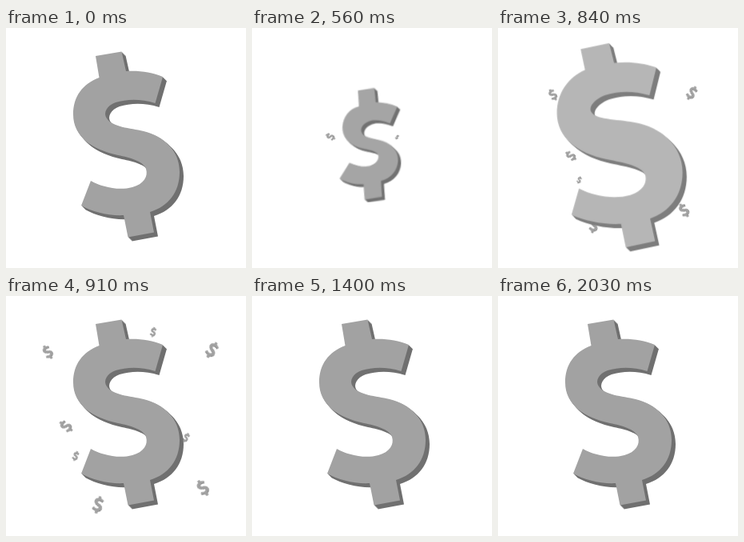
Write an HTML page without scripts that moves like this. It is 300x300 px and loops after 2170 ms.

```html
<!DOCTYPE html>
<html lang="en">
<head>
<meta charset="utf-8">
<title>Dollar burst</title>
<style>
  /* Three poses of the same outline, so they can be blended. */
  :root {
    --rest: path("M112 35 L144.5 29.5 L150 54 C166 53 182 55 196 61 L186.5 94 C168 88 150 89 137 93 C126 97 121 106 126 113 C133 124 155 125 172 129 C196 135 217 152 217 180 C217 205 203 223 180 230 L185 255.5 L152.5 261.5 L147 234 C129 235 108 230 94 222 L106 191 C118 198 140 204 158 199 C172 195 178 186 175 176 C171 166 155 162 140 159 C108 152 84 136 84 108 C84 85 96 70 116.5 62 Z");
    --small: path("M125 57 L150.5 54 L154 77.5 C166 78 177 81 188 86 L178 113 C164 106 150 105 143 109 C134 113 131 121 136 128 C142 136 156 136 168 141 C184 147 194 160 194 174 C194 190 185 202 169 206 L172 232 L145 235 L142 210 C128 210 114 206 104 199 L118 174 C132 181 147 184 156 178 C163 174 165 166 161 161 C156 155 143 154 132 150 C114 143 104 130 104 115 C104 99 113 86 128 83 Z");
    --bold: path("M98 27 L134 18 L140.5 41 C159 38 179 40 196 45 L189 79 C168 73 150 74 134 79 C121 83 108 92 109 99 C112 108 140 105 166 109 C208 114 238 143 238 178 C238 208 221 230 197 239 L204 268 L166 277 L160 248 C138 249 114 246 94 238 L100 206 C122 217 150 220 171 214 C186 209 193 198 190 188 C186 177 158 173 133 168 C95 160 69 138 69 108 C69 82 84 60 104 50 Z");
  }
  html, body { margin: 0; height: 100%; overflow: hidden; background: #fff; }
  svg { display: block; width: 100%; height: 100%; }
  path { d: var(--rest); fill: #a2a2a2; }
  .side path, path.side { fill: #707070; }

  /* One loop is 31 ticks of 70 ms. */
  .big {
    transform-origin: 148px 145px;
    animation: zoom 2170ms step-end infinite;
  }
  .big path { animation: morph 2170ms step-end infinite; }
  @keyframes morph {
    0%     { d: var(--rest); }
    19.35% { d: var(--small); }
    25.8%  { d: var(--small); animation-timing-function: steps(2, end); }
    32.25% { d: var(--bold); }
    35.48% { d: var(--bold); animation-timing-function: steps(2, end); }
    41.93%, 100% { d: var(--rest); }
  }
  @keyframes zoom {
    0%     { transform: matrix(1, 0, 0, 1, 0, 0); filter: brightness(1); }
    19.35% { transform: matrix(1, 0, 0, 1, 0, 0); filter: brightness(.97); animation-timing-function: steps(2, end); }
    25.8%  { transform: matrix(.8, -.036, -.043, .769, -1, 0); filter: brightness(1.02); animation-timing-function: steps(2, end); }
    32.25% { transform: matrix(1, 0, 0, 1, 0, 0); filter: brightness(1.25); }
    35.48% { transform: matrix(1.08, 0, 0, 1.08, 0, 0); filter: brightness(1.25); animation-timing-function: steps(2, end); }
    41.93%, 100% { transform: matrix(1, 0, 0, 1, 0, 0); filter: brightness(1); }
  }

  /* Each spark flies for 8 ticks, starting at tick --born. */
  .spark {
    opacity: 0;
    transform-origin: 0 0;
    animation: fly 2170ms infinite;
    animation-delay: calc(var(--born) * 70ms - .1ms);
  }
  @keyframes fly {
    0% {
      opacity: 1;
      transform: translate(0, 0) scale(0);
      animation-timing-function: steps(8, end);
    }
    25.806% {
      opacity: 1;
      transform: translate(calc(var(--dx) * 8px), calc(var(--dy) * 8px)) scale(.105);
      animation-timing-function: step-end;
    }
    25.81%, 100% { opacity: 0; transform: translate(0, 0) scale(0); }
  }
</style>
</head>
<body>
<svg viewBox="0 0 300 300">
  <defs>
    <g id="mini" transform="translate(-150 -148)">
      <path class="side" transform="translate(5 5)"/>
      <path/>
    </g>
  </defs>

  <g transform="translate(151 164)"><g class="spark" style="--born:6; --dx:15.2; --dy:-13.8"><use href="#mini" transform="rotate(42)"/></g></g>
  <g transform="translate(166 144)"><g class="spark" style="--born:4; --dx:-17; --dy:-2"><use href="#mini" transform="rotate(-55)"/></g></g>
  <g transform="translate(150 150)"><g class="spark" style="--born:7; --dx:-16.3; --dy:-13.3"><use href="#mini" transform="rotate(-22)"/></g></g>
  <g transform="translate(164 69)"><g class="spark" style="--born:9; --dx:5; --dy:-6"><use href="#mini" transform="rotate(22)"/></g></g>
  <g transform="translate(171 145)"><g class="spark" style="--born:7; --dx:-16; --dy:3"><use href="#mini" transform="rotate(-45)"/></g></g>
  <g transform="translate(145 160)"><g class="spark" style="--born:9; --dx:-14.5; --dy:10"><use href="#mini" transform="rotate(30)"/></g></g>
  <g transform="translate(150 163)"><g class="spark" style="--born:6; --dx:-5; --dy:14"><use href="#mini" transform="rotate(25)"/></g></g>
  <g transform="translate(185 165)"><g class="spark" style="--born:9; --dx:10; --dy:3"><use href="#mini" transform="rotate(38)"/></g></g>
  <g transform="translate(151.5 156)"><g class="spark" style="--born:6; --dx:13.5; --dy:12"><use href="#mini" transform="rotate(-22)"/></g></g>

  <g class="big">
    <g class="side">
      <path transform="translate(5 5)"/>
      <path transform="translate(4 4)"/>
      <path transform="translate(3 3)"/>
      <path transform="translate(2 2)"/>
      <path transform="translate(1 1)"/>
    </g>
    <path/>
  </g>
</svg>
</body>
</html>
```
